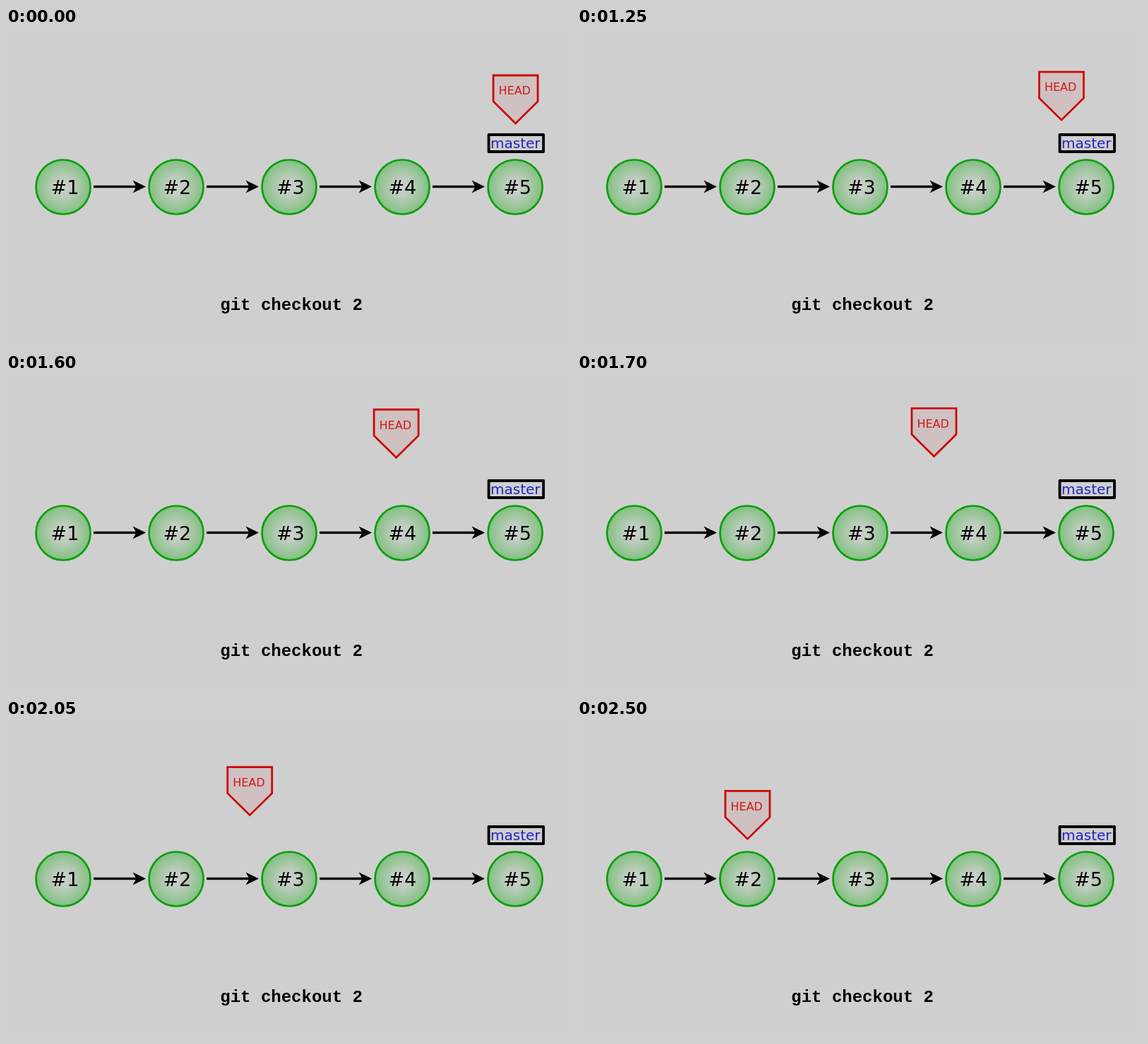
These frames come from a looping animation (800x450 px, 5050 ms). An HTML page with a canvas:

```html
<!DOCTYPE html>
<html lang="en">
<head>
<meta charset="utf-8">
<title>Checkout</title>
<style>
  html, body { margin: 0; width: 100%; height: 100%; overflow: hidden; background: #cfcfcf; }
  canvas { display: block; width: 800px; height: 450px; }
</style>
</head>
<body>
<canvas id="stage" width="800" height="450"></canvas>
<script>
const ctx = document.getElementById('stage').getContext('2d');
const SANS = '"DejaVu Sans", sans-serif';
const MONO = '"Liberation Mono", "Courier New", monospace';
const LOOP = 5050, STEP = 50, START = 1000, MOVE = 1500;
const LABEL_DX = [-17.4, -18.5, -18, -19.5, -16.8];

const smooth = u => u * u * (3 - 2 * u);
const mix = (a, b, u) => a + (b - a) * u;

function text(str, x, y, font, color) {
  ctx.font = font;
  ctx.fillStyle = color;
  ctx.fillText(str, x, y);
}

function polygon(points) {
  ctx.beginPath();
  points.forEach(([x, y]) => ctx.lineTo(x, y));
  ctx.closePath();
}

function commit(i) {
  const x = 81 + 160 * i, y = 225;
  const fill = ctx.createRadialGradient(x, y, 0, x, y, 39);
  fill.addColorStop(0, '#cdcfcd');
  fill.addColorStop(0.3, '#c0cdc0');
  fill.addColorStop(1, '#80c080');
  ctx.beginPath();
  ctx.arc(x, y, 38.5, 0, 2 * Math.PI);
  ctx.fillStyle = fill;
  ctx.fill();
  ctx.strokeStyle = '#0a9f0a';
  ctx.lineWidth = 2.7;
  ctx.stroke();
  text('#' + (i + 1), x + LABEL_DX[i], 234.5, '27px ' + SANS, '#000');
}

function arrow(x) {
  const y = 224.5;
  ctx.fillStyle = '#000';
  ctx.fillRect(x, y - 1.7, 62, 3.4);
  polygon([[x + 74, y], [x + 55.5, y - 9], [x + 60.5, y], [x + 55.5, y + 9]]);
  ctx.fill();
}

function branch() {
  ctx.lineJoin = 'round';
  ctx.strokeStyle = '#000';
  ctx.lineWidth = 3.8;
  ctx.strokeRect(683.5, 151, 77.5, 24);
  text('master', 686, 169.5, '20px ' + SANS, '#2424c4');
}

function head(x, y) {
  ctx.lineJoin = 'miter';
  polygon([[x - 31.5, y], [x + 31.5, y], [x + 31.5, y + 37], [x, y + 68], [x - 31.5, y + 37]]);
  ctx.fillStyle = '#cfc1c1';
  ctx.fill();
  ctx.strokeStyle = '#cc0808';
  ctx.lineWidth = 2.8;
  ctx.stroke();
  text('HEAD', x - 24, y + 27.3, '16px ' + SANS, '#d01818');
}

// The marker glides left while it rises, then drops onto its commit.
function headAt(t) {
  const u = Math.min(1, Math.max(0, (t - START) / MOVE));
  const y = u < 0.5
    ? mix(67, 48.3, smooth(2 * u))
    : mix(48.3, 100.4, smooth(2 * u - 1));
  return [mix(721.5, 241.5, smooth(u)), y];
}

function draw(t) {
  ctx.fillStyle = '#cfcfcf';
  ctx.fillRect(0, 0, 800, 450);
  for (let i = 0; i < 5; i++) {
    commit(i);
    if (i < 4) arrow(124 + 160 * i);
  }
  branch();
  head(...headAt(Math.floor(t / STEP) * STEP));
  text('git checkout 2', 303.3, 398.5, 'bold 24px ' + MONO, '#000');
}

const begin = performance.now();
function tick() {
  draw((performance.now() - begin) % LOOP);
  requestAnimationFrame(tick);
}
tick();
</script>
</body>
</html>
```
